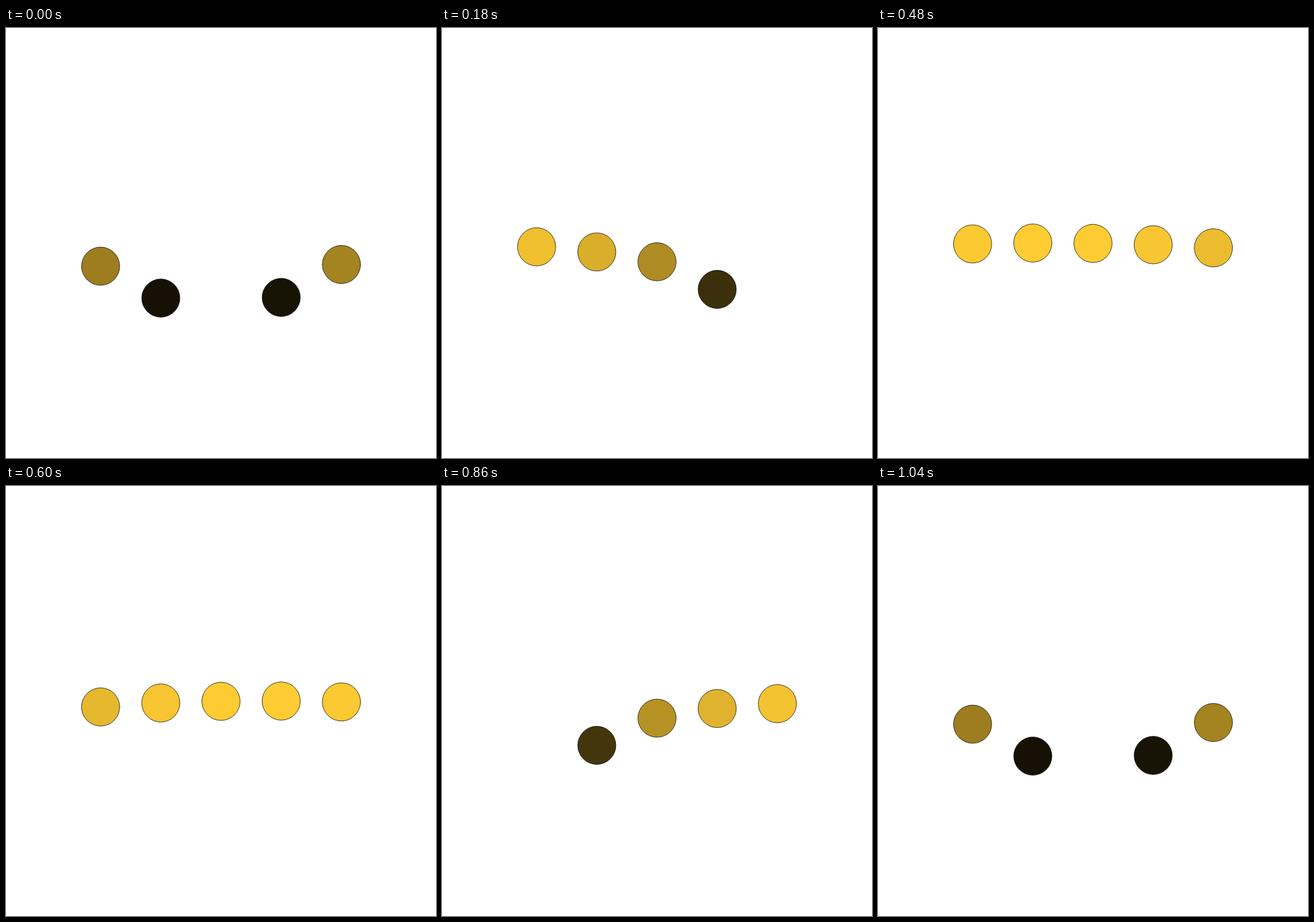
Animation, 640 px wide and 640 px high, one loop 1.06 s. Source, as an HTML page:

```html
<!DOCTYPE html>
<html lang="en">
<head>
<meta charset="utf-8">
<title>Dot wave</title>
<style>
  html, body { margin: 0; width: 100%; height: 100%; overflow: hidden; background: #fff; }
  svg { display: block; width: 100%; height: 100%; }
</style>
</head>
<body>
<svg id="stage" viewBox="0 0 640 640"></svg>
<script>
const LOOP = 1060, STEP = 20, PERIOD = 1040;
const DOTS = 5, SPACING = 89.6, CENTER = 320, DELAY = 80;
const FIRST = -80, LAST = 800;   // a dot is visible between these times
const YELLOW = [255, 204, 51];

// [time in ms, drop below the centre line in px]
const DROPS = [
  [-80, 82], [-60, 69], [0, 34.5], [80, 16.2], [160, 7.2], [240, 2.6], [320, 0.6],
  [400, 0.05], [480, 1.4], [560, 5.3], [640, 14], [720, 32], [780, 66], [800, 81]
];

// Signed roots make the curve nearly straight through its peak.
const knots = DROPS.map(([t, d]) => [t, Math.sign(t - 380) * Math.sqrt(d)]);
const secant = i => (knots[i + 1][1] - knots[i][1]) / (knots[i + 1][0] - knots[i][0]);
const slopes = knots.map(([t], i) => {
  if (i === 0) return secant(0);
  if (i === knots.length - 1) return secant(i - 1);
  const before = t - knots[i - 1][0], after = knots[i + 1][0] - t;
  return (secant(i - 1) * after + secant(i) * before) / (before + after);
});

function dropAt(t) {
  let i = 0;
  while (i < knots.length - 2 && t > knots[i + 1][0]) i++;
  const [t0, a] = knots[i], [t1, b] = knots[i + 1];
  const span = t1 - t0, s = (t - t0) / span, r = 1 - s;
  const root = r * r * (1 + 2 * s) * a + s * s * (3 - 2 * s) * b
    + span * s * r * (r * slopes[i] - s * slopes[i + 1]);
  return root * root;
}

const stage = document.getElementById('stage');
const dots = Array.from({ length: DOTS }, (_, i) => {
  const dot = document.createElementNS('http://www.w3.org/2000/svg', 'circle');
  dot.setAttribute('cx', CENTER + (i - 2) * SPACING);
  dot.setAttribute('r', 28.4);
  dot.setAttribute('stroke', '#000');
  dot.setAttribute('stroke-width', 0.7);
  return stage.appendChild(dot);
});

function draw(time) {
  const t = Math.floor((time % LOOP) / STEP) * STEP;
  dots.forEach((dot, i) => {
    const phase = (t - i * DELAY - FIRST + PERIOD) % PERIOD + FIRST;
    const visible = phase <= LAST;
    dot.setAttribute('visibility', visible ? 'visible' : 'hidden');
    if (!visible) return;
    const drop = dropAt(phase);
    const light = 1 - drop / SPACING;
    dot.setAttribute('cy', CENTER + drop);
    dot.setAttribute('fill', `rgb(${YELLOW.map(c => Math.round(c * light))})`);
  });
}

const start = performance.now();
function tick() {
  draw(performance.now() - start);
  requestAnimationFrame(tick);
}
tick();
</script>
</body>
</html>
```
